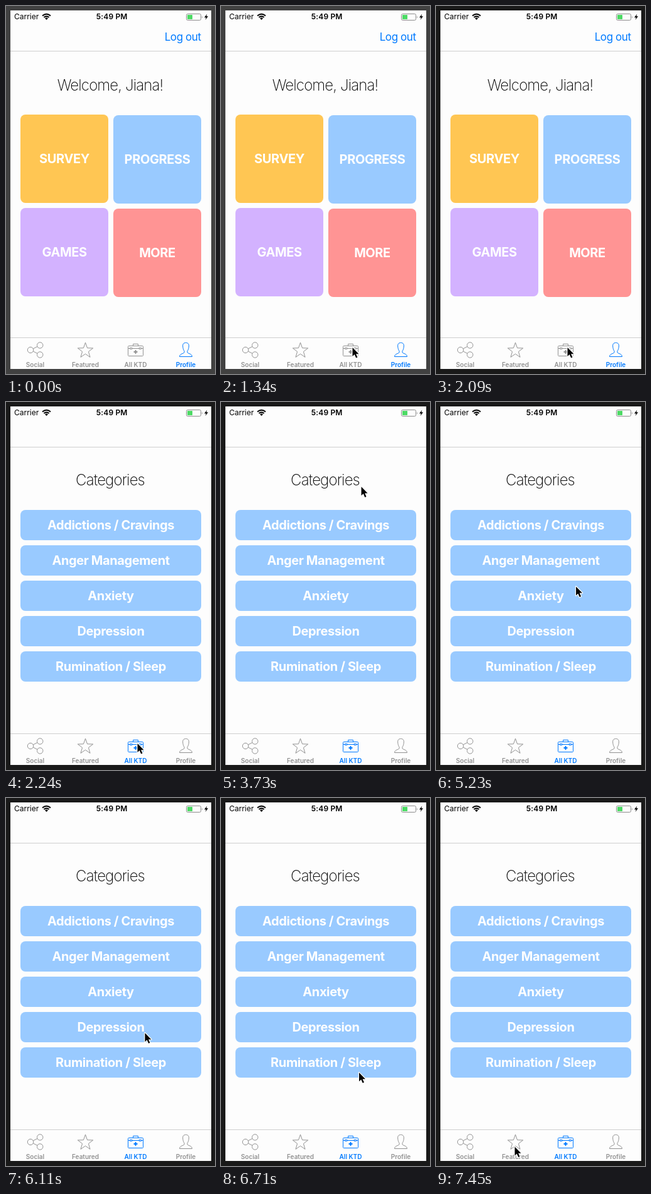
These frames come from a looping animation (333 by 583 pixels, 8000 ms). An HTML page:

```html
<!DOCTYPE html>
<html lang="en">
<head>
<meta charset="utf-8">
<style>
  html, body { margin: 0; width: 100%; height: 100%; overflow: hidden; }
  svg { display: block; width: 333px; height: 583px; font-family: Inter, Roboto, sans-serif; }
  .title { font-size: 24px; font-weight: 200; text-anchor: middle; letter-spacing: -.85px; }
  .button { font-size: 20px; font-weight: 700; fill: #fff; text-anchor: middle; letter-spacing: -.4px; }
  .tab { color: #929292; }
  .tab.on { color: #007aff; }
  .tab text { font-size: 10px; font-weight: 600; fill: currentColor; text-anchor: middle; }
  .icon { fill: none; stroke: currentColor; }
</style>
</head>
<body>
<svg viewBox="0 0 333 583">
  <rect id="frame" width="333" height="583"/>
  <rect x="7" y="7" width="320" height="568" fill="#fdfdfd"/>

  <g font-size="12">
    <text x="13" y="21">Carrier</text>
    <text x="168.7" y="21" font-weight="600" text-anchor="middle" letter-spacing=".15">5:49 PM</text>
  </g>
  <g fill="none" stroke="#000" stroke-width="2">
    <path d="M58 15.6Q64.5 9.8 71 15.6M60.4 18.1Q64.5 14.6 68.6 18.1"/>
    <path d="M64.5 22L62 19.5Q64.5 17.7 67 19.5Z" fill="#000" stroke="none"/>
  </g>
  <rect x="287.5" y="12.5" width="23" height="10" rx="2" fill="none" stroke="#8c8c8c"/>
  <rect x="289" y="14" width="8" height="7" fill="#4cd964"/>
  <path d="M312 15.5q1.6 2 0 4z" fill="#8c8c8c"/>
  <path d="M320.3 12.5L316 18.2H318.8L317.7 22L322 16.3H319.2Z"/>

  <path d="M7 71.5H327M7 525.5H327" stroke="#cfcfcf"/>

  <g id="home">
    <text x="310.7" y="55" font-size="17" fill="#007aff" text-anchor="end" letter-spacing="-.4">Log out</text>
    <text class="title" x="166" y="134">Welcome, Jiana!</text>
  </g>
  <g id="categories">
    <text class="title" x="166" y="132">Categories</text>
  </g>
  <g id="tabs"></g>

  <path id="cursor" d="M0 0V14L3.2 11L5.7 16.6L8 15.6L5.6 10.2H10Z" stroke="#fff" stroke-width="2.4" stroke-linejoin="round" paint-order="stroke"/>
</svg>
<script>
const LOOP = 8000, DARKEN = 2090, SWITCH = 2240, STEP = 148;
const el = id => document.getElementById(id);
const append = (id, markup) => el(id).insertAdjacentHTML('beforeend', markup);

function addButton(parent, label, x, y, w, h, color) {
  append(parent, `<rect x="${x}" y="${y}" width="${w}" height="${h}" rx="8" fill="${color}"/>
    <text class="button" x="${x + w / 2}" y="${y + h / 2 + 7}">${label}</text>`);
}

const tiles = { SURVEY: '#ffc653', PROGRESS: '#99caff', GAMES: '#d3b2ff', MORE: '#ff9494' };
Object.entries(tiles).forEach(([label, color], i) => {
  const col = i % 2, row = i >> 1;
  addButton('home', label, 23 + 148 * col, 172 + 148 * row + col, 140, 140, color);
});
['Addictions / Cravings', 'Anger Management', 'Anxiety', 'Depression', 'Rumination / Sleep']
  .forEach((label, i) => addButton('categories', label, 23, 171 + 56 * i, 288, 48, '#99caff'));

// Icons are drawn around the centre of their tab.
const star = Array.from({ length: 10 }, (_, i) => {
  const r = i % 2 ? 5.2 : 12.8, a = i * Math.PI / 5;
  return `${r * Math.sin(a)} ${1 - r * Math.cos(a)}`;
}).join('L');

const icons = {
  Social: `<circle cx="-7.5" r="4.7"/><circle cx="7.7" cy="-7.5" r="4.7"/><circle cx="7.7" cy="7.5" r="4.7"/>
    <path d="M3.5 -5.4L-3.3 -2.1M3.5 5.4L-3.3 2.1"/>`,
  Featured: `<path d="M${star}Z"/>`,
  'All KTD': `<rect x="-12" y="-6.5" width="24" height="16" rx="1"/>
    <path d="M-4 -7V-9.5H4V-7M-12 -2.5H-9M-5.5 -2.5H5.5M9 -2.5H12M-9 -3.5h3.5v2H-9zM5.5 -3.5H9v2H5.5z"/>
    <path d="M0 0V6M-3 3H3" stroke-width="2"/>`,
  Profile: `<path d="M0 -11.5C-4 -11.5 -5 -9 -4.8 -6C-4.6 -2.5 -3.8 0 -2.5 1.5V4C-4 6 -9.5 5.5 -10 10.5H10C9.5 5.5 4 6 2.5 4V1.5C3.8 0 4.6 -2.5 4.8 -6C5 -9 4 -11.5 0 -11.5Z"/>`
};
Object.entries(icons).forEach(([label, icon], i) => append('tabs',
  `<g class="tab" transform="translate(${46.5 + 80 * i} 545)"><g class="icon">${icon}</g><text y="26.5">${label}</text></g>`));
const [, , kitTab, profileTab] = el('tabs').children;

// Pointer moves: each leg runs from the previous resting point in a few discrete steps.
const entry = { x: 218, y: 570 };
const legs = [
  { start: 1050, steps: 3, x: 209.5, y: 541 },
  { start: 2840, steps: 4, x: 223.5, y: 127 },
  { start: 3730, steps: 3, x: 224, y: 193 },
  { start: 4330, steps: 4, x: 224, y: 245 },
  { start: 5230, steps: 2, x: 222.5, y: 322, power: 0.7 },
  { start: 5670, steps: 6, x: 220, y: 435 },
  { start: 7010, steps: 4, x: 125.5, y: 552.5 }
];

function pointerAt(t) {
  const index = legs.findLastIndex(leg => t >= leg.start);
  if (index < 0) return null;
  const from = legs[index - 1] || entry, { start, steps, x, y, power = 2 } = legs[index];
  const step = Math.min(steps, Math.floor((t - start + 6) / STEP) + 1);
  const p = (step / steps) ** power;
  return { x: from.x + (x - from.x) * p, y: from.y + (y - from.y) * p };
}

function show(id, visible) {
  el(id).setAttribute('visibility', visible ? 'visible' : 'hidden');
}

function render(t) {
  const switched = t >= SWITCH, pointer = pointerAt(t);
  el('frame').setAttribute('fill', t < DARKEN ? '#414141' : '#191919');
  show('home', !switched);
  show('categories', switched);
  kitTab.classList.toggle('on', switched);
  profileTab.classList.toggle('on', !switched);
  show('cursor', pointer);
  if (pointer) el('cursor').setAttribute('transform', `translate(${pointer.x} ${pointer.y})`);
}

const startTime = performance.now();
function tick() {
  render((performance.now() - startTime) % LOOP);
  requestAnimationFrame(tick);
}
tick();
</script>
</body>
</html>
```
